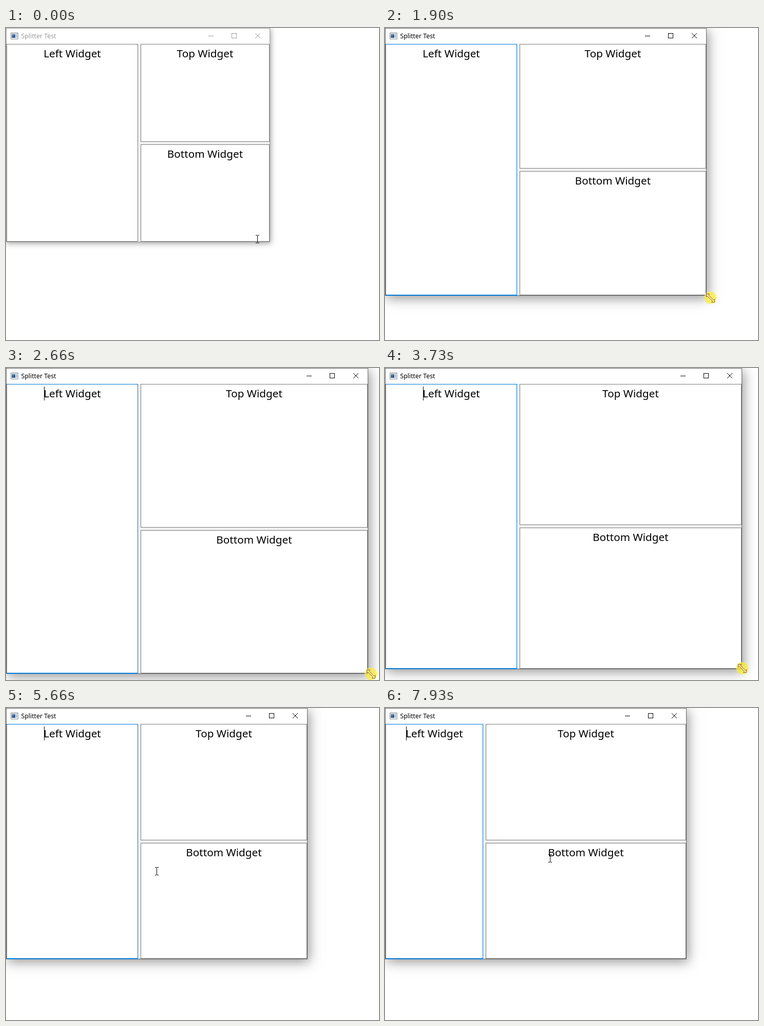
An HTML page with a canvas for the animation above (8 s loop, 726 by 606 pixels).

```html
<!DOCTYPE html>
<html lang="en">
<head>
<meta charset="utf-8">
<title>Splitter Test</title>
<style>
html, body { margin: 0; width: 100%; height: 100%; overflow: hidden; background: #fff; }
canvas { display: block; }
</style>
</head>
<body>
<canvas id="stage" width="726" height="606"></canvas>
<script>
const ctx = document.getElementById('stage').getContext('2d');
const LOOP = 8000, GRAY = '#7a7a7a', BLUE = '#0078d7';

// Screen updates come in bursts: start, end, number of steps
const bursts = [
  [0, 0, 1], [70, 690, 10], [1220, 1970, 12], [2040, 2790, 12], [2860, 3130, 5],
  [3400, 3400, 1], [3600, 4370, 12], [4420, 4570, 3], [4970, 5730, 11],
  [5800, 5800, 1], [6070, 6630, 9], [6830, 7250, 7], [7650, 7930, 5]
];

// Keys: time, then values
const corner = [
  [1220, 513, 415], [1902, 625, 519], [1970, 635, 526], [2654, 704, 593], [3130, 710, 598],
  [3530, 710, 598], [3740, 694, 584], [4420, 596, 499], [4570, 586, 487]
];
const splitter = [[6000, 256], [6630, 413], [6760, 413], [7250, 190]];
const pointer = [
  [0, 489, 410], [350, 508, 429], [690, 518, 417], [1220, 518, 417], [1902, 633, 524],
  [1970, 644, 533], [2654, 710, 594], [3130, 714, 599], [3530, 714, 599], [3740, 695, 583],
  [4420, 598, 496], [4570, 591, 488], [4900, 591, 488], [5730, 263, 300], [5800, 258, 300],
  [6000, 258, 300], [6630, 414, 322], [6760, 414, 322], [7250, 192, 318],
  [7580, 192, 318], [7930, 321, 292]
];

function snap(t) {
  const [start, end, steps] = bursts.findLast(b => t >= b[0]);
  if (steps === 1) return start;
  const step = (end - start) / (steps - 1);
  return Math.min(end, start + step * Math.floor((t - start + 12) / step));
}

function at(keys, t) {
  const i = keys.findIndex(k => k[0] > t);
  if (i === 0) return keys[0].slice(1);
  if (i < 0) return keys.at(-1).slice(1);
  const a = keys[i - 1], b = keys[i], p = (t - a[0]) / (b[0] - a[0]);
  return a.slice(1).map((v, j) => Math.round(v + (b[j + 1] - v) * p));
}

function rect(color, x, y, w, h) {
  ctx.fillStyle = color;
  ctx.fillRect(x, y, w, h);
}

// Box given by its inclusive pixel edges
function box(stroke, x1, y1, x2, y2, fill) {
  rect(stroke, x1, y1, x2 - x1 + 1, y2 - y1 + 1);
  rect(fill, x1 + 1, y1 + 1, x2 - x1 - 1, y2 - y1 - 1);
}

function text(str, x, y, size, color, align) {
  ctx.font = `${size}px "Noto Sans", "Open Sans", sans-serif`;
  ctx.textAlign = align;
  ctx.fillStyle = color;
  ctx.fillText(str, x, y);
}

function panel(label, x1, y1, x2, y2) {
  box(GRAY, x1, y1, x2, y2, '#fff');
  text(label, (x1 + x2 + 1) / 2, y1 + 26, 20.7, '#000', 'center');
}

function shape(points, fill, stroke) {
  ctx.beginPath();
  points.forEach(([x, y]) => ctx.lineTo(x, y));
  ctx.closePath();
  ctx.fillStyle = fill;
  ctx.fill();
  ctx.strokeStyle = stroke;
  ctx.lineWidth = 1;
  ctx.stroke();
}

function titleBar(right, active) {
  const ink = active ? '#000' : '#999';
  box('#8e959c', 9, 9, 23, 21, '#eef1f4');
  rect('#c3cad2', 10, 10, 13, 1);
  const blue = ctx.createLinearGradient(11, 12, 17, 19);
  blue.addColorStop(0, '#6d9bc4');
  blue.addColorStop(1, '#1d3f6e');
  rect(blue, 11, 12, 7, 7);
  rect('#b9c2cc', 19, 12, 3, 7);
  text('Splitter Test', 29.5, 20, 12.3, ink, 'left');

  rect(ink, right - 119, 15, 10, 1);
  box(ink, right - 74, 10, right - 65, 19, '#fff');
  ctx.strokeStyle = ink;
  ctx.lineWidth = 1;
  ctx.beginPath();
  for (const [y1, y2] of [[10, 20], [20, 10]]) {
    ctx.moveTo(right - 28, y1);
    ctx.lineTo(right - 18, y2);
  }
  ctx.stroke();
}

const mirror = points => points.map(([x, y]) => [-x, -y]);
const halfDiagonal = [[-8, -8], [-2, -8], [-4, -6], [6, 4]];
const halfSplit = [[-11, 0], [-6.5, -4.5], [-6.5, -1.5], [-2.5, -1.5], [-2.5, 1.5], [-6.5, 1.5], [-6.5, 4.5]];

const cursors = {
  ibeam() {
    for (const y of [-8, 7]) {
      rect('#000', -3, y, 3, 1);
      rect('#000', 1, y, 3, 1);
    }
    rect('#000', 0, -7, 1, 14);
  },
  arrow() {
    shape([[.5, .5], [.5, 16.5], [4, 13], [6.5, 18.5], [8.5, 17.5], [6, 12], [11.5, 12]], '#fff', '#000');
  },
  diagonal(fill, ink) {
    const tail = [[8, 2]];
    const half = [...halfDiagonal, ...tail];
    shape([...half, ...mirror(half)], fill, ink);
  },
  split(fill, ink) {
    shape(halfSplit, fill, ink);
    shape(mirror(halfSplit), fill, ink);
    shape([[-2.5, -9.5], [2.5, -9.5], [2.5, 9.5], [-2.5, 9.5]], fill, ink);
  }
};

function cursorKind(x, y, right, bottom, split) {
  if (Math.abs(x - right) < 8 && Math.abs(y - bottom) < 8) return 'diagonal';
  if (x > right || y > bottom) return 'arrow';
  return x > split && x <= split + 5 ? 'split' : 'ibeam';
}

function drawCursor(t, right, bottom, split) {
  const [x, y] = at(pointer, t);
  const sizing = t >= 1220 && t < 4970, splitting = t >= 6070 && t < 7650;
  const pressed = sizing || splitting;
  const kind = sizing ? 'diagonal' : splitting ? 'split' : cursorKind(x, y, right, bottom, split);
  ctx.save();
  ctx.translate(x, y);
  if (pressed) {
    ctx.fillStyle = 'rgba(250,236,50,.7)';
    ctx.beginPath();
    ctx.arc(0, 0, 12, 0, 7);
    ctx.fill();
  }
  if (kind === 'diagonal' || kind === 'split') ctx.translate(.5, .5);
  cursors[kind](pressed ? '#fbf49a' : '#fff', pressed ? '#94581c' : '#000');
  ctx.restore();
}

function draw(now) {
  const t = snap(now % LOOP);
  const [right, bottom] = at(corner, t), [split] = at(splitter, t);
  const active = t >= 1220;
  const middle = 30 + Math.ceil((bottom - 36) / 2);

  rect('#fff', 0, 0, 726, 606);
  ctx.save();
  ctx.shadowColor = active ? 'rgba(0,0,0,.42)' : 'rgba(0,0,0,.4)';
  ctx.shadowBlur = active ? 22 : 11;
  ctx.shadowOffsetX = active ? 3 : 1;
  ctx.shadowOffsetY = active ? 5 : 2;
  rect('#fff', 0, 0, right + 1, bottom + 1);
  ctx.restore();

  box(active ? '#666' : '#a0a0a0', 0, 0, right, bottom, '#f0f0f0');
  rect('#fff', 1, 1, right - 1, 30);
  titleBar(right, active);

  panel('Left Widget', 1, 31, split, bottom - 1);
  panel('Top Widget', split + 6, 31, right - 1, middle);
  panel('Bottom Widget', split + 6, middle + 6, right - 1, bottom - 1);

  if (active) {
    if (t < 6070 || t >= 6830) {
      rect(BLUE, 1, 31, split, 1);
      rect(BLUE, split, 31, 1, bottom - 31);
    }
    rect(BLUE, 1, bottom - 1, split, 2);
    const caretOn = Math.floor((t - 1280) / 530) % 2 === 0;
    if (caretOn) rect('#000', Math.round((split + 2) / 2 - 55), 36, 1, 27);
  }
  drawCursor(t, right, bottom, split);
}

let begin;
function loop(now) {
  begin ??= now;
  draw(now - begin);
  requestAnimationFrame(loop);
}
requestAnimationFrame(loop);
</script>
</body>
</html>
```
